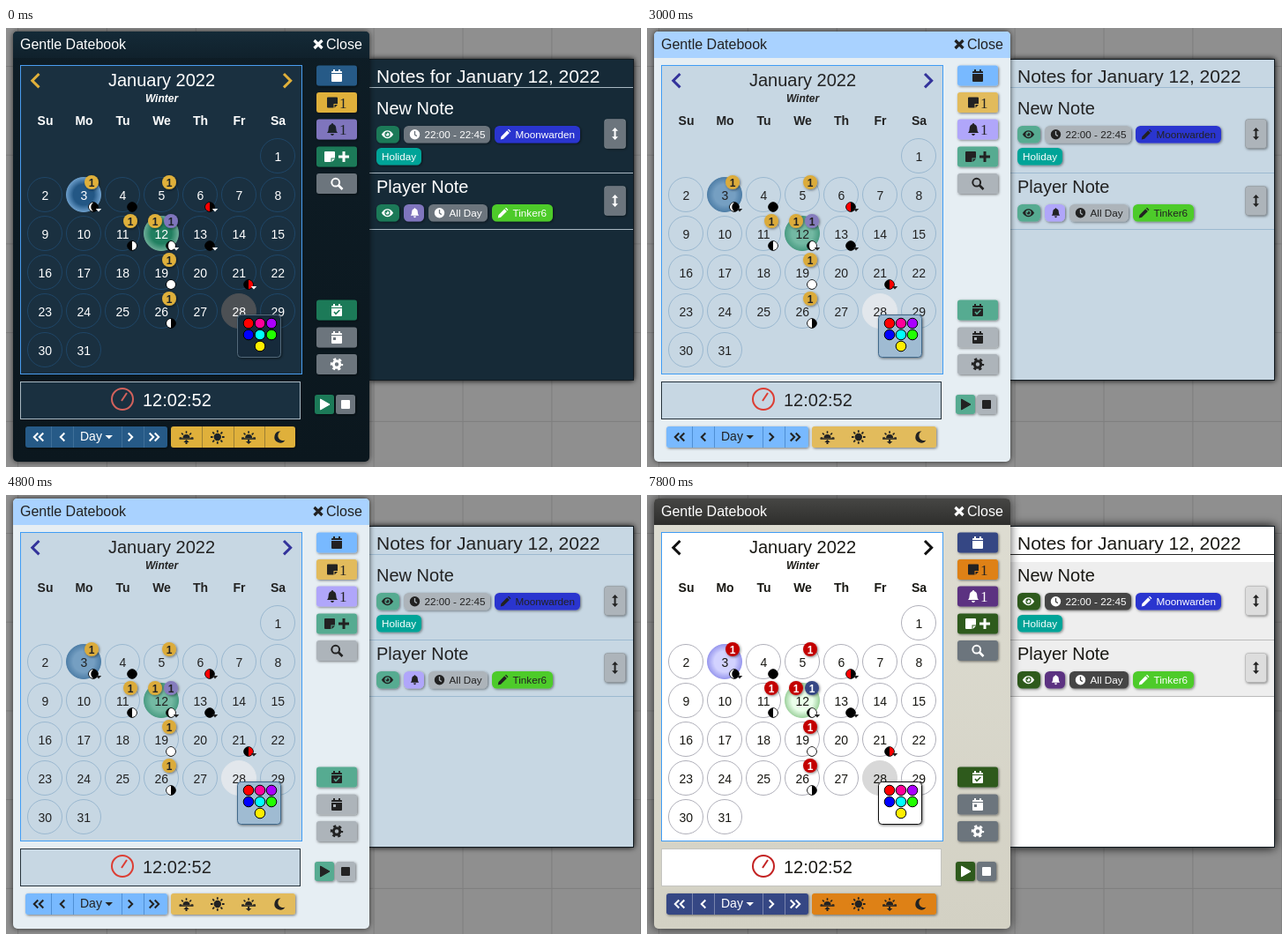
These frames come from a looping animation (720 px wide and 498 px high, 9000 ms). An HTML page:

```html
<!DOCTYPE html>
<html lang="en">
<meta charset="utf-8">
<title>Calendar themes</title>
<style>
  html, body { margin: 0; width: 100%; height: 100%; overflow: hidden; background: #8f8f8f; }
  svg { display: block; width: 720px; height: 498px; font-family: "Liberation Sans", Arial, sans-serif; }
</style>
<svg id="stage" viewBox="0 0 720 498"></svg>
<script>
const themes = [
  { // dark
    text: '#fff', icon: '#fff', alt: '#1c2328', bell: '#1c2328', caret: '#fff', shadow: 3,
    header: ['#142a37', '#10212c'], body: ['#0e1d26', '#0b171e'], panel: '#1a3040', frame: '#4a9df0',
    notes: '#162a37', row: '#162a37', rule: '#a9b8c2', underline: '#a9b8c2', clockFrame: '#a9b8c2',
    ring: '#1f4667', today: ['#235785', '#6a9cc9'], chosen: ['#217f60', '#69ab95'], hover: '#4c5054',
    chevron: '#e0b03a', badge: '#dfb03b', badge2: '#7f75bd', badgeText: '#1c2328',
    blue: '#255a87', yellow: '#dfb03b', purple: '#7f75bd', green: '#1b7a58', grey: '#6c757d',
    tag: '#6c757d', tagText: '#fff', move: '#6c757d', moveIcon: '#fff', dial: '#d2625c',
    popup: '#172c3b', popupFrame: '#52697a', split: '#3f7099'
  },
  { // light
    text: '#222', icon: '#222', alt: '#222', bell: '#222', caret: '#222', shadow: 3,
    header: ['#a9d2ff', '#a9d2ff'], body: ['#e6eef3', '#e6eef3'], panel: '#c7d7e3', frame: '#3f9cf4',
    notes: '#c7d7e3', row: '#c7d7e3', rule: '#9cb9d0', underline: '#9cb9d0', clockFrame: '#26323b',
    ring: '#9ab8d0', today: ['#759fc2', '#4f7fa8'], chosen: ['#73b9a3', '#4b9d84'], hover: '#e2e7ec',
    chevron: '#33339b', badge: '#dbab3a', badge2: '#857bbd', badgeText: '#222',
    blue: '#78b9ff', yellow: '#e2bb5b', purple: '#b0a6fa', green: '#56ab91', grey: '#adb4ba',
    tag: '#adb4ba', tagText: '#222', move: '#adb4ba', moveIcon: '#222', dial: '#dc3d33',
    popup: '#9fbbd2', popupFrame: '#40688a', split: '#4f8fd4'
  },
  { // parchment
    text: '#191813', icon: '#fff', alt: '#222', bell: '#fff', caret: '#222', shadow: 6,
    header: ['#464644', '#2e2e2c'], body: ['#deddd2', '#d3d1c4'], panel: '#fff', frame: '#3f9cf4',
    notes: '#fff', row: '#eee', rule: '#bbb', underline: '#222', clockFrame: '#c4c4c0',
    ring: '#b0b0ba', today: ['#d2d2ff', '#9a9aef'], chosen: ['#eaffea', '#a2d4a2'], hover: '#d8d8d8',
    chevron: '#111', badge: '#c30000', badge2: '#344684', badgeText: '#fff',
    blue: '#344684', yellow: '#de8112', purple: '#5b3081', green: '#2d5a1f', grey: '#6c757d',
    tag: '#444', tagText: '#fff', move: '#ddd', moveIcon: '#222', dial: '#c32222',
    popup: '#fff', popupFrame: '#111', split: '#7884ad'
  }
];

const rect = (x, y, w, h, fill, r = 0, more = '') =>
  `<rect x="${x}" y="${y}" width="${w}" height="${h}" rx="${r}" fill="${fill}" ${more}/>`;
const circle = (x, y, r, fill, stroke = 'none', more = '') =>
  `<circle cx="${x}" cy="${y}" r="${r}" fill="${fill}" stroke="${stroke}" ${more}/>`;
const path = (d, fill, more = '') => `<path d="${d}" fill="${fill}" fill-rule="evenodd" ${more}/>`;
const line = (d, color, width = 1) => path(d, 'none', `stroke="${color}" stroke-width="${width}"`);
const at = (x, y, content, scale = 1) => `<g transform="translate(${x} ${y}) scale(${scale})">${content}</g>`;
const text = (x, y, s, size, fill, more = '') =>
  `<text x="${x}" y="${y}" font-size="${size}" fill="${fill}" ${more}>${s}</text>`;
const middle = 'text-anchor="middle"', bold = 'font-weight="bold"', soft = 'filter="url(#soft)"';
const gradient = (id, [a, b]) => `<linearGradient id="${id}" x2="0" y2="1">
  <stop stop-color="${a}"/><stop offset="1" stop-color="${b}"/></linearGradient>`;
const glow = (id, [a, b]) => `<radialGradient id="${id}"><stop offset=".6" stop-color="${a}"/>
  <stop offset="1" stop-color="${b}"/></radialGradient>`;

// Icons are centred on 0,0; c is the ink and b the colour behind it.
const calendar = 'M-6-3V-4Q-6-5-5-5H-4V-7H-2V-5H2V-7H4V-5H5Q6-5 6-4V-3ZM-6-2H6V6Q6 7 5 7H-5Q-6 7-6 6Z';
const halfSun = 'M-4 2A4 4 0 0 1 4 2Z';
const rays = n => [...Array(n)].map((_, i) => {
  const a = -Math.PI + i * Math.PI / 4, x = Math.cos(a), y = Math.sin(a);
  return `M${x * 5.2} ${y * 5.2}L${x * 7.8} ${y * 7.8}`;
}).join('');
const horizon = (c, arrow) => at(0, -1, path(halfSun, c) + at(0, 2, line(rays(5), c, 1.6)) +
  line('M-8 3H8', c, 1.5) + path(arrow, c));
const icons = {
  calendar: c => path(calendar, c),
  check: (c, b) => path(calendar, c) + line('M-3 2L-1 4.3L3.3 0', b, 1.6),
  day: c => path(calendar + 'M-4 0H-1V3H-4Z', c),
  note: c => path('M-6-5Q-6-6-5-6H5Q6-6 6-5V1.5H1.5V6H-5Q-6 6-6 5ZM2.5 6V2.5H6Z', c),
  plus: c => line('M-6 0H6M0-6V6', c, 3),
  bell: c => path('M-.8-7H.8V-6Q4.3-5 4.3-1Q4.3 2.5 6 4H-6Q-4.3 2.5-4.3-1Q-4.3-5-.8-6ZM-2 5H2Q1.5 7 0 7T-2 5Z', c),
  search: c => circle(-1.3, -1.3, 4.4, 'none', c, 'stroke-width="2"') + line('M2 2L6.5 6.5', c, 2.6),
  cog: c => circle(0, 0, 3.7, 'none', c, 'stroke-width="3"') +
    circle(0, 0, 6, 'none', c, 'stroke-width="2.4" stroke-dasharray="3.1 3.183" stroke-dashoffset="1.5"'),
  play: c => path('M-4.5-6L6 0L-4.5 6Z', c, `stroke="${c}" stroke-linejoin="round"`),
  stop: c => rect(-5, -5, 10, 10, c, 1),
  eye: (c, b) => path('M-7 0Q-4-4.7 0-4.7T7 0Q4 4.7 0 4.7T-7 0Z', c) + circle(0, 0, 3.3, b) +
    circle(0, 0, 2, c) + circle(-1, -1, .9, b),
  clock: (c, b) => circle(0, 0, 6, c) + line('M0-4V.3L2.4 2', b, 1.4),
  pencil: c => path('M-6 6L-5.4 2.6L1.8-4.6L4.6-1.8L-2.6 5.4ZM2.6-5.4L3.7-6.2L6.2-3.7L5.4-2.6Z', c),
  move: c => path('M0-7L3.5-3.3H1V3.3H3.5L0 7L-3.5 3.3H-1V-3.3H-3.5Z', c),
  close: c => line('M-4.5-4.5L4.5 4.5M-4.5 4.5L4.5-4.5', c, 3.2),
  sunrise: c => horizon(c, 'M0 4L3.2 7H1V9H-1V7H-3.2Z'),
  sun: c => circle(0, 0, 4.2, c) + line(rays(8), c, 1.8),
  sunset: c => horizon(c, 'M0 9L3.2 6H1V4H-1V6H-3.2Z'),
  moon: c => path('M1-6.5A6.5 6.5 0 1 0 6 3.4A5.4 5.4 0 0 1 1-6.5Z', c),
  left: c => line('M2.3-4.5L-2.2 0L2.3 4.5', c, 2),
  right: c => line('M-2.3-4.5L2.2 0L-2.3 4.5', c, 2)
};
const icon = (name, x, y, c, b, scale) => at(x, y, icons[name](c, b), scale);
const dayX = d => 44 + (d + 5) % 7 * 44;
const dayY = d => 145 + Math.floor((d + 5) / 7) * 44;

function background() {
  let d = '';
  for (let i = 0; i < 5; i++) d += `M0 ${43.5 + i * 100.7}H720`;
  for (let x = 13.5; x < 720; x += 100.9) d += `M${x} 0V498`;
  return rect(0, 0, 720, 498, '#8f8f8f') + line(d, '#7e7e7e');
}

// lit: 'R' right half, 'L' left half, 'F' full, 'C' crescent, 'G' gibbous, 'N' new
function moon(day, lit, color, caret, t) {
  const shapes = {
    R: 'M0-5A5 5 0 0 1 0 5Z', L: 'M0-5A5 5 0 0 0 0 5Z', N: '',
    F: 'M0-5A5 5 0 0 1 0 5A5 5 0 0 1 0-5Z',
    C: 'M0-5A5 5 0 0 0 0 5A6 6 0 0 1 0-5Z', G: 'M0-5A5 5 0 0 1 0 5A3 5 0 0 1 0-5Z'
  };
  return at(dayX(day) + 11, dayY(day) + 14, circle(0, 0, 5.3, '#000', '#000') + path(shapes[lit], color) +
    (caret ? path('M2.8 2H9.2L6 5.4Z', t.caret) : ''));
}

function monthView(t) {
  let s = rect(16.5, 42.5, 319, 350, t.panel, 0, `stroke="${t.frame}"`) +
    line('M37.5 52L29.8 59.7L37.5 67.4M315 52L322.7 59.7L315 67.4', t.chevron, 3) +
    text(176.5, 66, 'January 2022', 20, t.text, middle) +
    text(176.5, 84, 'Winter', 12, t.text, `${middle} ${bold} font-style="italic"`);
  ['Su', 'Mo', 'Tu', 'We', 'Th', 'Fr', 'Sa'].forEach((name, i) =>
    s += text(44.5 + i * 44, 110, name, 14, t.text, middle + bold.padStart(20)));
  const fills = { 3: 'url(#today)', 12: 'url(#chosen)', 28: t.hover };
  for (let d = 1; d <= 31; d++)
    s += circle(dayX(d), dayY(d), 19.5, fills[d] || 'none', d == 28 ? t.hover : d == 3 ? t.today[1] : d == 12 ? t.chosen[1] : t.ring) +
      text(dayX(d) + .3, dayY(d) + 5.5, d, 14, t.text, middle);
  const badge = (d, dx, fill) => at(dayX(d) + dx, dayY(d) - 14,
    circle(0, 0, 8, fill, 'none', soft) + text(0, 4.5, 1, 12, t.badgeText, middle + ' ' + bold));
  for (const d of [3, 5, 11, 19, 26]) s += badge(d, 9, t.badge);
  s += badge(12, -7, t.badge) + badge(12, 11, t.badge2);
  for (const [day, lit, color, caret] of [
    [3, 'C', '#fff', 1], [4, 'N', '#000'], [6, 'L', '#f00', 1], [11, 'R', '#fff'], [12, 'G', '#fff', 1],
    [13, 'N', '#000', 1], [19, 'F', '#fff'], [21, 'R', '#f00', 1], [26, 'L', '#fff']
  ]) s += moon(day, lit, color, caret, t);
  s += rect(262.5, 325.5, 49, 48, t.popup, 4, `stroke="${t.popupFrame}" ${soft}`);
  ['#f00', '#f09', '#a0f', '#00f', '#0ff', '#2f0', '#fe0'].forEach((c, i) =>
    s += circle(i == 6 ? 288 : 275 + i % 3 * 13, 335 + Math.floor(i / 3) * 13, 5.8, c, '#000'));
  return s;
}

function sideButtons(t) {
  const button = (y, fill) => rect(352, y - 11.5, 46, 23, fill, 3, soft);
  const single = (y, fill, name) => button(y, fill) + icon(name, 375, y, t.icon, fill);
  const counted = (y, fill, name, c) => button(y, fill) + icon(name, 370, y, c, fill) +
    text(378, y + 6, 1, 17, c, 'font-family="Liberation Serif, serif"');
  return single(54, t.blue, 'calendar') + counted(84.5, t.yellow, 'note', t.alt) +
    counted(115, t.purple, 'bell', t.bell) + button(146, t.green) + icon('note', 367, 146, t.icon) +
    icon('plus', 383, 146, t.icon) + single(176.5, t.grey, 'search') + single(320, t.green, 'check') +
    single(351, t.grey, 'day') + single(381.5, t.grey, 'cog') +
    rect(350, 416, 22, 22, t.green, 3, soft) + icon('play', 361, 427, t.icon) +
    rect(374, 416, 22, 22, t.grey, 3, soft) + icon('stop', 385, 427, t.icon);
}

function clockBar(t) {
  let s = rect(16.5, 401.5, 317, 42, t.panel, 0, `stroke="${t.clockFrame}"`) +
    circle(132, 421, 12, 'none', t.dial, 'stroke-width="2"') + line('M131 423L137 414', t.dial, 2) +
    text(155, 429, '12:02:52', 20, t.text) +
    rect(22, 452, 161, 24, t.blue, 3, soft) + rect(187, 452, 141, 24, t.yellow, 3, soft) +
    line('M51.5 452V476M76.5 452V476M131.5 452V476M156.5 452V476', t.split) +
    line('M222.5 452V476M258.5 452V476M293.5 452V476', t.alt + '55') +
    text(84, 468, 'Day', 14, t.icon) + path('M112.5 462H121L116.8 466.3Z', t.icon);
  for (const [name, x] of [['left', 34], ['left', 40], ['left', 64], ['right', 141], ['right', 165], ['right', 171]])
    s += icon(name, x, 464, t.icon);
  ['sunrise', 'sun', 'sunset', 'moon'].forEach((name, i) => s += icon(name, 204.5 + i * 35.3, 464, t.alt));
  return s;
}

function notesPanel(t) {
  const tag = (x, y, w, fill, name, label = '', c = t.tagText) => rect(x, y, w, 19.5, fill, 5.5, soft) +
    (name ? icon(name, x + 12.5, y + 9.7, c, fill, name == 'bell' ? .78 : .95) : '') +
    text(x + (name ? 23.5 : 6), y + 13.8, label, 11.7, c);
  const move = y => rect(678.5, y, 24, 33, t.move, 3, `${soft} stroke="${t.moveIcon}" stroke-opacity=".15"`) +
    icon('move', 690.5, y + 16.5, t.moveIcon);
  return rect(412, 35, 300, 365, '#000', 0, 'filter="url(#cast)"') +
    rect(411.5, 35.5, 300, 364, t.notes, 0, 'stroke="#111a20"') +
    rect(412, 76, 299, 152, t.row) +
    line('M412 67.5H711', t.underline) + line('M412 164.5H711M412 228.5H711', t.rule) +
    text(420, 62, 'Notes for January 12, 2022', 21, t.text) +
    text(420, 98, 'New Note', 20, t.text) + text(420, 187, 'Player Note', 20, t.text) +
    tag(420, 111, 26, t.green, 'eye') + tag(451, 111, 98, t.tag, 'clock', '22:00 - 22:45') +
    tag(554, 111, 97, '#2b34cf', 'pencil', 'Moonwarden') + tag(420, 136, 51, '#00a498', '', 'Holiday', '#fff') +
    tag(420, 200, 26, t.green, 'eye') + tag(451, 200, 23, t.purple, 'bell') +
    tag(479, 200, 67, t.tag, 'clock', 'All Day') + tag(551, 200, 69, '#4dcb29', 'pencil', 'Tinker6') +
    move(103.5) + move(179.5);
}

function scene(t) {
  const headText = t.text == '#222' ? '#222' : '#fff';
  return `<defs>${gradient('header', t.header)}${gradient('body', t.body)}${glow('today', t.today)}${glow('chosen', t.chosen)}
    <filter id="soft" x="-30%" y="-30%" width="160%" height="170%">
      <feDropShadow dx="1" dy="1" stdDeviation="1.5" flood-opacity=".5"/></filter>
    <filter id="cast"><feGaussianBlur stdDeviation="${t.shadow}"/></filter></defs>` +
    background() + notesPanel(t) +
    rect(8, 4, 404, 488, '#000', 5, 'filter="url(#cast)" opacity=".7"') +
    rect(8, 4, 404, 488, 'url(#body)', 5) + path('M8 34V9Q8 4 13 4H407Q412 4 412 9V34Z', 'url(#header)') +
    text(16, 24, 'Gentle Datebook', 16, headText) + icon('close', 354, 18.5, headText) +
    text(363, 24, 'Close', 16, headText) +
    monthView(t) + sideButtons(t) + clockBar(t);
}

const stage = document.getElementById('stage');
let shown = -1;
function tick() {
  const index = Math.floor(performance.now() % 9000 / 3000);
  if (index !== shown) stage.innerHTML = scene(themes[shown = index]);
  requestAnimationFrame(tick);
}
tick();
</script>
</html>
```
